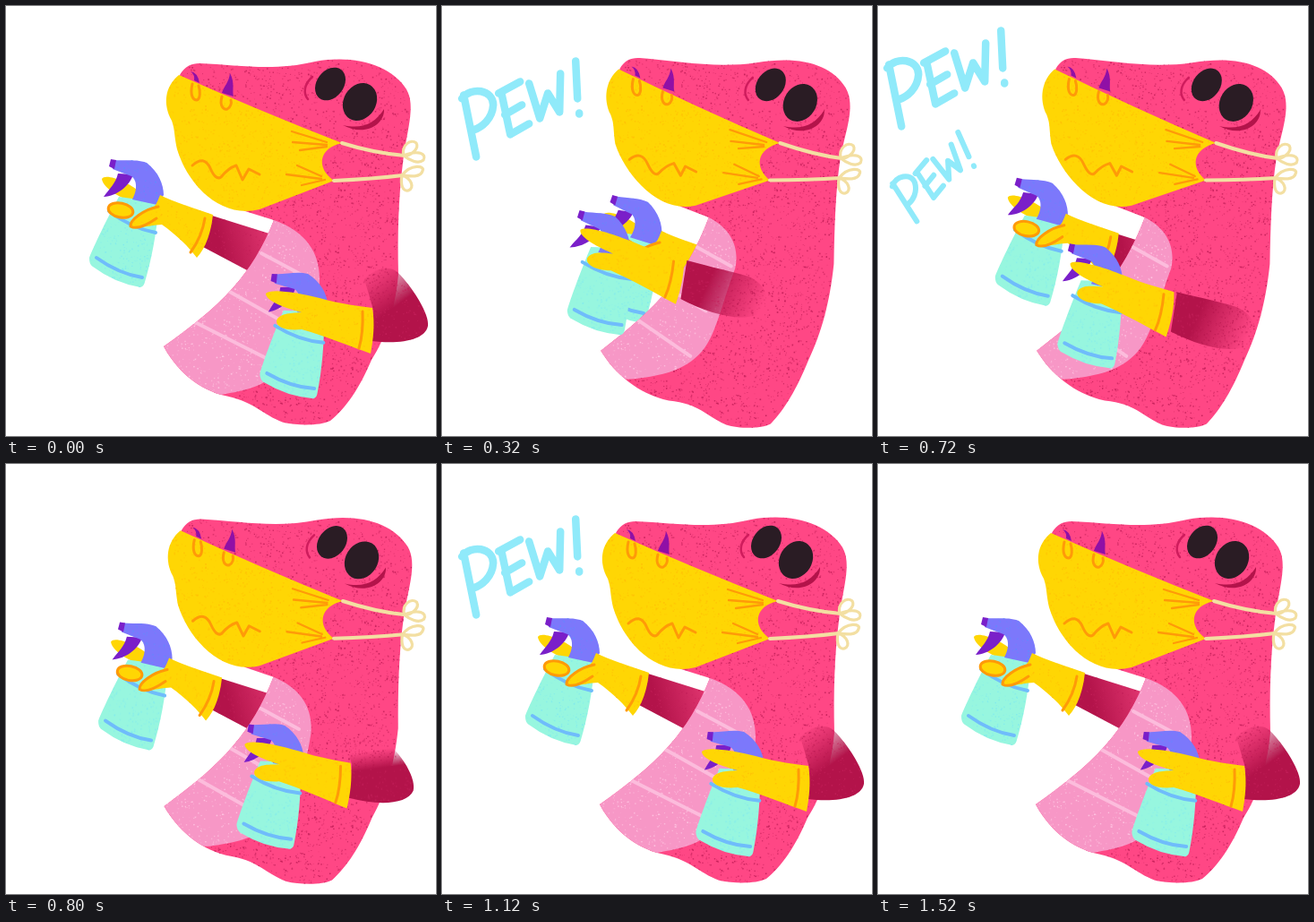
An HTML page with a canvas for the animation above (1600 ms loop, 480 by 480 pixels).

```html
<!DOCTYPE html>
<html lang="en">
<head>
<meta charset="utf-8">
<title>Pew</title>
<style>
  html, body { margin: 0; height: 100%; overflow: hidden; background: #fff; }
  canvas { display: block; width: 100vmin; height: 100vmin; }
</style>
</head>
<body>
<canvas id="stage" width="480" height="480"></canvas>
<script>
const ctx = document.getElementById('stage').getContext('2d');
const PINK = '#ff4785', RED = '#b3134a', YELLOW = '#ffd604', ORANGE = '#ff9a08',
      CYAN = '#90eafa', VIOLET = '#7c78fb', PURPLE = '#7a1fc9', CREAM = '#f3dfa2',
      MINT = '#97f6df', BLUE = '#6fbcfb', BLACK = '#2a1c24';
const STEP = 80, FRAMES = 20;

// Pose amounts per step, starting at the first shot
const FAR = [0, .22, .58, .88, 1, 1, .75, .3, .08];
const NEAR = [0, .42, .83, .97, 1, 1, .85, .48, .15];
const LEAN = [0, .3, .6, .85, 1, 1, .85, .6, .25];

function mix(a, b, k) {
  const number = /-?[\d.]+/g, target = b.match(number);
  let i = 0;
  return new Path2D(a.replace(number, n => (+n + (target[i++] - n) * k).toFixed(2)));
}

function grain(color, count, seed) {
  const tile = document.createElement('canvas');
  tile.width = tile.height = 480;
  const g = tile.getContext('2d');
  const random = () => (seed = seed * 16807 % 2147483647) / 2147483647;
  g.fillStyle = color;
  for (let i = 0; i < count; i++) {
    const size = .6 + random() * 1.1;
    g.globalAlpha = .35 + random() * .6;
    g.fillRect(random() * 480, random() * 480, size, size);
  }
  return ctx.createPattern(tile, 'repeat');
}
const DARK_GRAIN = grain('#c4205a', 10000, 11), PALE_GRAIN = grain('#ffc6e2', 7500, 23),
      GOLD_GRAIN = grain('#ffc107', 9000, 37), MINT_GRAIN = grain('#7fe9ef', 9000, 53),
      VIOLET_GRAIN = grain('#5f8cff', 9000, 71);

const path = d => typeof d === 'string' ? new Path2D(d) : d;

function fill(d, color, texture) {
  const p = path(d);
  for (const style of [color, texture]) {
    if (!style) continue;
    ctx.fillStyle = style;
    ctx.fill(p);
  }
}

function line(d, color, width) {
  ctx.strokeStyle = color;
  ctx.lineWidth = width;
  ctx.stroke(path(d));
}

function oval(x, y, rx, ry, angle, color, outline) {
  const p = new Path2D();
  p.ellipse(x, y, rx, ry, angle, 0, 7);
  fill(p, color);
  if (outline) line(p, outline, 3);
}

function at(x, y, draw) {
  ctx.save();
  ctx.translate(x, y);
  draw();
  ctx.restore();
}

function gradient(x0, y0, x1, y1, from, to) {
  const g = ctx.createLinearGradient(x0, y0, x1, y1);
  g.addColorStop(0, from);
  g.addColorStop(1, to);
  return g;
}

// Sprayer with its nozzle at the origin; the head tips forward with the lean
function sprayer(squeeze, tilt) {
  fill('M10 40 C-2 62 -18 95 -23 108 C-23 113 -22 116 -19 118 Q5 136 34 141 Q38 140 39 135 C46 112 52 82 55 46 Z', MINT, MINT_GRAIN);
  line('M-15 108 Q10 126 36 130 M-1 56 Q24 75 51 80', BLUE, 4);
  at(0, 0, () => {
    ctx.rotate(tilt);
    fill(squeeze ? 'M9 14 L26 15 C24 28 18 38 10 46 L5 41 C10 32 11 22 9 14 Z'
                 : 'M9 14 L26 15 C22 28 8 39 -7 40 C0 30 6 26 9 14 Z', PURPLE);
    fill('M5 -1 C20 0 30 -2 41 2 C54 12 60 26 60 38 L53 49 L25 43 C32 30 29 20 24 17 L3 9 Z', VIOLET, VIOLET_GRAIN);
    fill('M1 -2 L7 -1 L5 9 L-1 6 Z', PURPLE);
  });
}

function spray() {
  line('M-7 -2 L-15 -11 M-10 0 L-27 -9 M-10 3 L-24 2', CYAN, 2.5);
}

function farArm(k, squeeze, shot) {
  at(116 + 126 * k, 173 + 69 * k, () => {
    fill('M114 61 L181 82 L172 132 L104 96 Z', gradient(125, 100, 180, 86, RED, '#e0356f'), DARK_GRAIN);
    if (!squeeze) fill('M-9 20 C-5 13 22 24 32 34 L24 45 C8 40 -8 29 -9 20 Z', YELLOW);
    sprayer(squeeze, .16 * k);
    fill('M115 60 C94 53 70 45 56 38 C52 47 52 51 44 54 C32 58 21 67 23 73 C28 77 48 71 58 71 C74 82 89 97 97 108 C108 96 113 78 115 60 Z', YELLOW, GOLD_GRAIN);
    line('M106 64 Q103 84 90 102', ORANGE, 3);
    line('M54 51 C38 54 22 66 23 73 C30 77 42 71 52 64', ORANGE, 3);
    if (squeeze) oval(16, 31, 12, 10, .2, YELLOW, ORANGE);
    oval(12, 55, 14, 8, .2, YELLOW, ORANGE);
    if (shot) spray();
  });
}

function nearArm(k, squeeze, shot) {
  const w = Math.min(1, 2 * k);
  const blend = (a, b) => a + (b - a) * w;
  at(296 - 173 * k, 301 - 93 * k + 44 * k * (1 - k), () => {
    const fade = gradient(blend(108, 205), blend(-6, 105), blend(138, 145), blend(35, 78), 'rgba(179,19,74,0)', RED);
    fill(mix('M114 38 L104 4 C124 -16 139 -6 141 -4 C159 14 177 44 175 56 C172 72 144 77 112 73 Z',
             'M121 54 L121 54 C150 62 170 66 190 72 C208 80 214 95 207 110 C190 125 150 116 114 97 Z', w), fade, DARK_GRAIN);
    ctx.save();
    ctx.rotate(-.095);
    sprayer(squeeze, .2 * k);
    ctx.restore();
    if (shot) spray();
    ctx.translate(-6 + 8 * w, 20);
    ctx.rotate(.14 * w);
    fill(mix('M0 0 C6 -6 35 -1 60 5 C85 12 105 14 119 16 C122 34 120 51 117 67 C95 59 65 47 40 40 C22 42 11 37 12 30 C16 21 30 22 40 21 C25 17 0 9 0 0 Z',
             'M8 5 C14 -8 35 -5 58 1 C85 10 105 13 119 16 C122 34 120 51 117 67 C95 59 75 48 52 42 C26 47 7 47 8 35 C10 26 24 28 34 25 C20 24 6 20 8 5 Z', squeeze ? 1 : 0), YELLOW, GOLD_GRAIN);
    line('M108 20 Q109 44 104 61', ORANGE, 3);
  });
}

function body(k) {
  const shape = mix(
    'M194 77 C200 67 207 64 216 64 C260 66 300 73 345 62 C390 54 430 66 447 93 C458 112 447 140 443 175 C438 215 437 255 438 300 C434 340 424 370 408 395 C394 428 380 448 362 463 C350 469 325 468 310 465 C285 456 278 441 240 434 C210 425 190 405 176 380 C240 335 275 300 299 239 L270 230 C240 222 200 100 194 77 Z',
    'M201 66 C206 56 214 53 224 54 C265 58 310 68 355 64 C405 56 437 64 453 90 C465 112 453 138 446 165 C440 200 439 240 437 280 C432 325 424 360 410 395 C396 430 385 450 370 469 C358 475 335 474 322 469 C300 459 295 446 262 445 C225 438 195 415 178 388 C245 335 272 300 297 234 L270 222 C245 215 205 90 201 66 Z', k);
  fill(shape, PINK, DARK_GRAIN);
  ctx.save();
  ctx.clip(shape);
  const apron = mix(
    'M299 239 C335 252 350 275 350 305 C350 360 320 400 300 412 C280 428 260 430 240 434 L150 434 L150 300 Z',
    'M297 234 C318 248 320 270 312 285 C283 325 294 362 270 381 C248 400 215 403 190 405 L150 405 L150 300 Z', k);
  fill(apron, '#f797c6', PALE_GRAIN);
  ctx.clip(apron);
  line(mix('M285 276 L330 300 M248 318 L305 350 M211 353 L300 398',
           'M283 264 L318 284 M256 314 L287 334 M221 347 L262 386', k), '#fcbcdc', 4);
  ctx.restore();
}

function head(k) {
  fill(mix('M193 77 Q283 117 375 153 C350 158 345 180 366 195 L283 227 C240 238 203 200 191 160 C187 140 189 140 185 128 C175 110 177 90 193 77 Z',
           'M200 66 Q289 112 379 153 C352 160 350 180 366 194 L283 220 C242 228 206 180 195 150 C193 128 195 128 190 116 C183 100 186 78 200 66 Z', k), YELLOW, GOLD_GRAIN);
  line(mix('M319 140 L358 152 M320 152 L358 155 M328 161 L358 157 M325 178 L352 190 M313 188 L352 193 M330 200 L356 194',
           'M323 137 L365 152 M324 150 L360 155 M333 158 L360 157 M327 176 L355 190 M315 185 L352 191 M332 198 L357 193', k), ORANGE, 2.3);
  line(mix('M208 178 Q221 166 228 181 Q234 195 240 191 Q248 181 257 178 L264 194 L271 182 L283 188',
           'M210 167 Q224 157 231 174 Q238 188 243 184 Q251 176 260 174 L268 186 L272 177 L284 183', k), ORANGE, 3);
  at(9 * k, -9 * k, () => {
    fill('M206 73 Q214 74 216 86 L210 83 Q211 77 206 73 Z M250 75 C256 86 252 95 254 101 L241 97 C243 90 249 85 250 75 Z', '#9010a6');
    line('M208 87 C205 100 209 105 213 105 C217 104 217 95 215 89 M241 101 C238 112 243 116 247 115 C251 113 252 108 251 105', ORANGE, 3);
  });
  at(8 * k, 1.5 * k, () => {
    oval(362, 87, 15, 20, .65, BLACK);
    oval(395, 107, 18, 22, .55, BLACK);
    line('M342 79 C332 88 332 98 337 104', '#cf1c5d', 2.5);
    fill('M376 133 C398 138 412 131 422 115 C423 133 400 146 376 133 Z', RED);
  });
  line(mix('M375 153 Q410 164 445 167 M366 195 Q410 193 443 189',
           'M379 153 Q420 168 447 172 M366 194 Q410 195 445 194', k), CREAM, 4);
  at(2 * k, 5 * k, () => line('M444 167 C441 155 452 148 458 153 C462 160 450 168 444 167 C460 160 470 165 466 172 C460 177 450 172 444 167 M442 189 C452 176 468 178 465 184 C463 192 450 190 442 189 C440 200 443 207 449 206 C457 203 452 192 442 189', CREAM, 3.2));
}

function pew() {
  line('M29 112 L43 181 M27 116 C37 102 62 106 62 123 C61 139 49 148 40 151 M68 110 L92 97 M71 109 L81 156 M75 134 L94 123 M81 156 L102 144 M102 99 L114 138 L123 110 L136 131 L137 88 M154 74 L156 116 M158 132 L158 133', CYAN, 8.5);
}

function draw(now) {
  const n = Math.floor(now / STEP) % FRAMES, step = n - 2;
  const lean = LEAN[step] ?? 0;
  const farShot = n === 2 || n === 12, nearShot = n === 7;
  ctx.clearRect(0, 0, 480, 480);
  farArm(FAR[step] ?? 0, farShot || n === 3 || n === 13, farShot);
  body(lean);
  head(lean);
  nearArm(NEAR[step] ?? 0, nearShot || n === 8, nearShot);

  const age = n < 10 ? n - 2 : n - 12;
  if ((n >= 2 && n < 10) || (n >= 12 && n < 19)) at(-2.4 * age, 1 - 6.8 * age, pew);
  if (n >= 7 && n < 10) {
    at(51 - 3.5 * (n - 7), 248 - 4 * (n - 7), () => {
      ctx.rotate(-.37);
      ctx.scale(.71, .71);
      ctx.translate(-44, -181);
      pew();
    });
  }
}

ctx.lineCap = ctx.lineJoin = 'round';
const start = performance.now();
function tick() {
  draw(performance.now() - start);
  requestAnimationFrame(tick);
}
tick();
</script>
</body>
</html>
```
